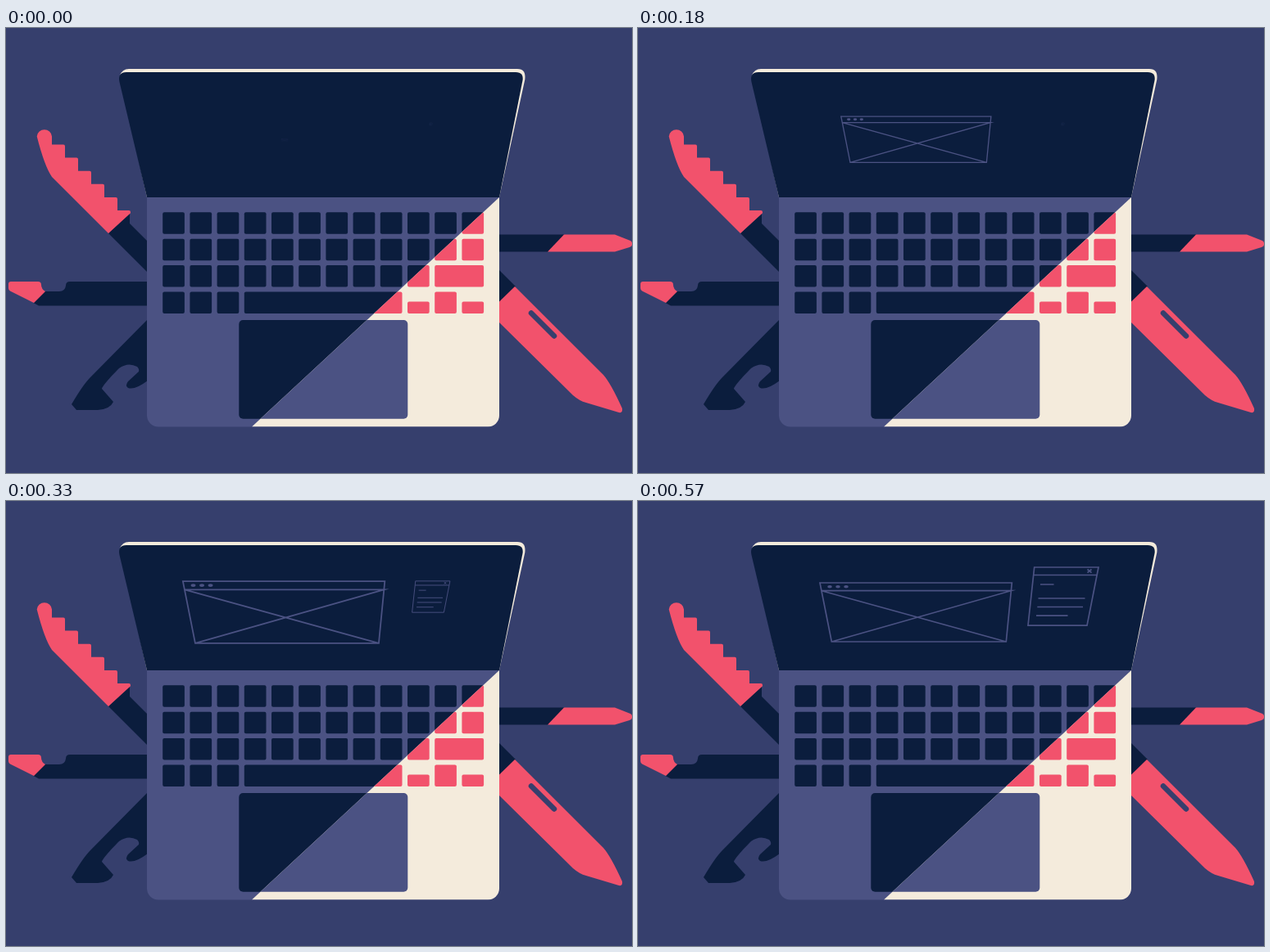
Recreate the animation shown at these times as an HTML page with a canvas. Size 764 by 544 pixels, loop 2940 ms.

```html
<!DOCTYPE html>
<html lang="en">
<head>
<meta charset="utf-8">
<title>Laptop multitool</title>
<style>
  html, body { margin: 0; width: 100%; height: 100%; overflow: hidden; background: #363f6d; }
  canvas { display: block; }
</style>
</head>
<body>
<canvas id="stage" width="764" height="544"></canvas>
<script>
const ctx = document.getElementById('stage').getContext('2d');
const BACK = '#363f6d', NAVY = '#0b1d3d', DECK = '#4b5283', CREAM = '#f4ebdc', RED = '#f2526c';
const LOOP = 2940, STEP = 30;

function shape(color, path) {
  ctx.fillStyle = color;
  ctx.fill(new Path2D(path));
}

function box(x, y, w, h, r) {
  ctx.beginPath();
  ctx.roundRect(x, y, w, h, r);
  ctx.fill();
}

function drawTools() {
  // saw
  shape(NAVY, 'M151 224V239L173 261V299L125 251Z');
  const teeth = 'h14q2 0 2 2v14.1'.repeat(5);
  shape(RED, `M37.7 132.5A9.2 9.2 0 0 1 56 132.5V142.5${teeth}h14q2 0 2 2v1.2L125 251L56 182Q47 169 37.7 132.5Z`);

  // can opener
  shape(NAVY, 'M46 322H65Q72 322 73 315Q73 310 78 310H173V339.5H40L33.5 336Z');
  shape(RED, 'M6 310H39Q43 310 43 314Q43 319 48 322L34 336L5 321.5Q3 320 3 318V313Q3 310 6 310Z');

  // bottle opener
  shape(NAVY, 'M173 356L103 427Q94 436 80 460L86 467H112Q127 466 131 457L117 441C118 437 130 424 138 416Q149 408 160 414Q163 417 162 420L149 432Q145 437 149 440Q157 443 173 431Z');

  // screwdriver
  shape(NAVY, 'M601 252.5H682L662 273.5H601Z');
  shape(RED, 'M681 252.5H743L762 260Q764 261 764 263V265Q764 267 761 268L743 273.5H661Z');

  // blade
  shape(NAVY, 'M601 295L622 316L601 337Z');
  shape(RED, 'M621 316L729 424Q738 434 752 465Q753 471 748 470L708 458Q700 456 692 449L601 359V335.5Z');
  ctx.strokeStyle = BACK;
  ctx.lineWidth = 6.5;
  ctx.lineCap = 'round';
  ctx.stroke(new Path2D('M641 348.5L669 376.5'));
}

function drawKeys() {
  const left = col => 191.2 + col * 33.2;
  const top = row => 225.3 + row * 32.4;
  const key = (row, col, span = 1, cut = 0) =>
    box(left(col), top(row) + cut, 26.7 + (span - 1) * 33.2, 26.5 - cut, 2);
  for (let row = 0; row < 3; row++)
    for (let col = 0; col < (row < 2 ? 12 : 10); col++) key(row, col);
  key(2, 10, 2);
  for (let col = 0; col < 3; col++) key(3, col);
  key(3, 3, 6);
  key(3, 9, 1, 12);
  key(3, 10);
  key(3, 11, 1, 12);
}

function drawBase(deck, keys, pad) {
  ctx.fillStyle = deck;
  box(172, 207, 430, 280.5, [0, 0, 14, 14]);
  ctx.fillStyle = keys;
  drawKeys();
  ctx.fillStyle = pad;
  box(284.3, 357, 206, 120.7, 5);
}

function drawLaptop() {
  shape(CREAM, 'M139 58Q142 50 150 50H624Q635 50 633.3 63L602 207H172Z');
  shape(NAVY, 'M147 54H622Q632 54 630.5 64L602 207H172L138.5 66Q136 54 147 54Z');
  drawBase(DECK, NAVY, NAVY);
  ctx.save();
  ctx.clip(new Path2D('M602 207L300 487.5H602Z'));
  drawBase(CREAM, RED, DECK);
  ctx.restore();
}

function drawScaled(x, y, scale, path) {
  ctx.save();
  ctx.translate(x, y);
  ctx.scale(scale, scale);
  ctx.translate(-x, -y);
  ctx.strokeStyle = ctx.fillStyle = DECK;
  ctx.lineWidth = 1.7;
  ctx.lineCap = 'butt';
  ctx.stroke(new Path2D(path));
  return () => ctx.restore();
}

function drawBrowser(scale) {
  const done = drawScaled(340, 137, scale,
    'M222 100H456.3L449.3 172H236.3ZM224 109.7H455.3L236.3 172M224 109.7L449.3 172');
  for (const x of [234, 244, 254]) {
    ctx.beginPath();
    ctx.ellipse(x, 104.7, 2.8, 1.8, 0, 0, Math.PI * 2);
    ctx.fill();
  }
  done();
}

function drawNote(scale) {
  drawScaled(518.5, 117.5, scale,
    'M483.7 81H562L548 152.2H476ZM482.7 90.5H560M548.5 83.5L553.5 87.7M553.5 83.5L548.5 87.7' +
    'M491 102H507.5M488.5 119H545.5M487.3 129.5H543M486 140.2H524.5')();
}

// Grows past full size in 270 ms, then settles in 90 ms.
function popScale(t, start) {
  if (t <= 0) return start;
  if (t < 270) return start + (1.155 - start) * t / 270;
  return 1 + 0.155 * Math.max(0, 1 - (t - 270) / 90);
}

function render(now) {
  const t = Math.floor(now % LOOP / STEP) * STEP;
  ctx.fillStyle = BACK;
  ctx.fillRect(0, 0, 764, 544);
  drawTools();
  drawLaptop();
  drawBrowser(popScale(t, 0.034));
  drawNote(popScale(t - 210, 0.045));
}

let begin;
function tick(now) {
  begin ??= now;
  render(now - begin);
  requestAnimationFrame(tick);
}
render(0);
requestAnimationFrame(tick);
</script>
</body>
</html>
```
